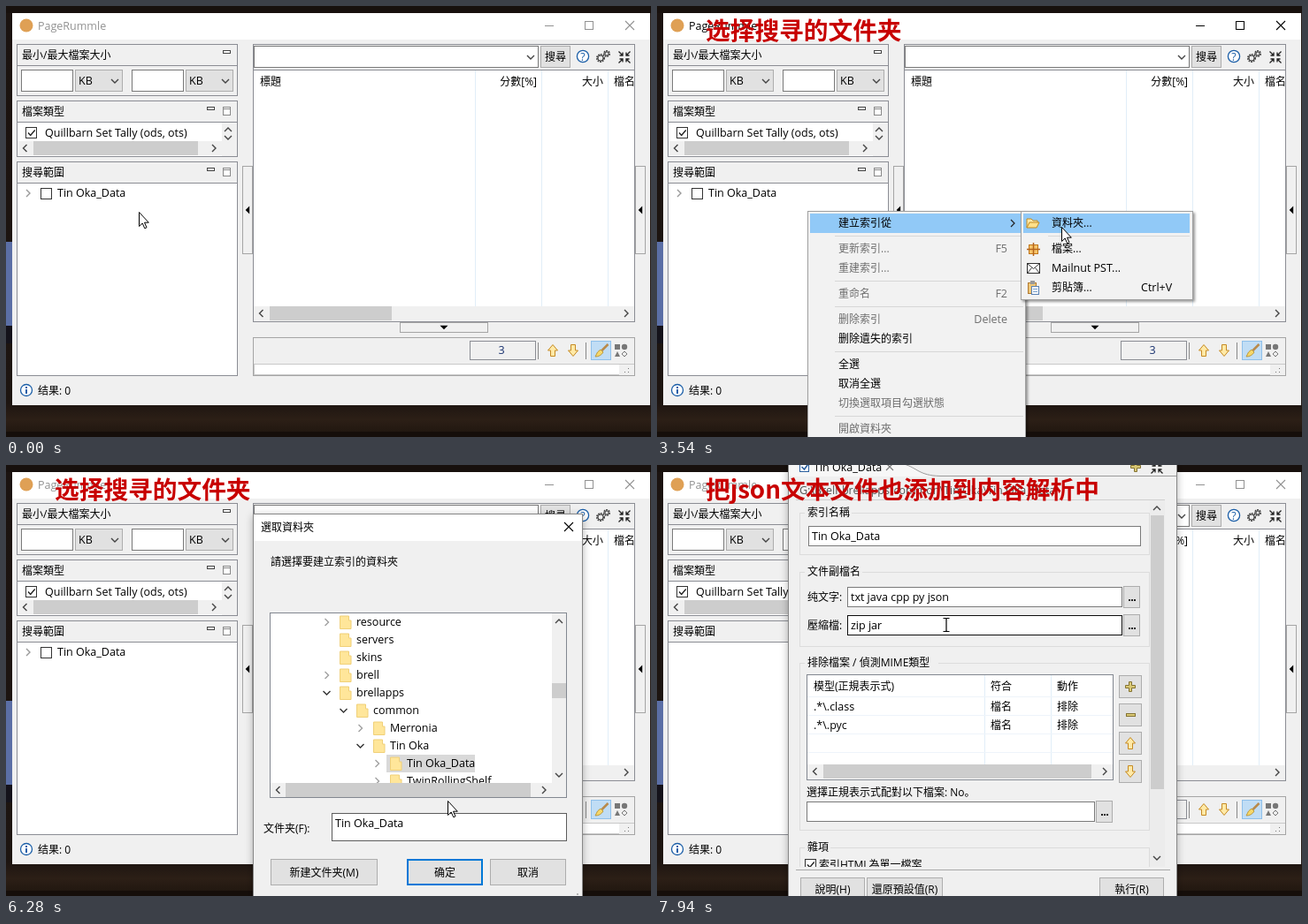
These frames come from a looping animation (729 by 488 pixels, 7990 ms). An HTML page:

```html
<!DOCTYPE html>
<html lang="zh">
<head>
<meta charset="utf-8">
<title>Index setup</title>
<style>
html, body { margin: 0; width: 100%; height: 100%; overflow: hidden; background: #1d1310; }
svg { display: block; }
text { font-family: "Open Sans", "Noto Sans CJK SC", "Noto Sans CJK TC", "Noto Sans CJK", sans-serif; white-space: pre; }
.caption { font-family: "Noto Sans CJK SC", "Noto Sans CJK TC", "Noto Sans CJK", sans-serif; font-weight: 700; font-size: 27.7px; fill: #c80000; }
</style>
</head>
<body>
<svg id="stage" width="729" height="488" viewBox="0 0 729 488"></svg>
<script>
const LOOP = 7990;
const FOLDER = 'Tin Oka_Data';
const FACE = '#f0f0f0', EDGE = '#8b8d94', FIELD = '#7a7a7a', DIM = '#6d6d6d', HOT = '#91c9f7';

// Drawing helpers; boxes are given by their corners.
const box = (x1, y1, x2, y2, fill, stroke, w = 1) => stroke
  ? `<rect x="${x1 + w / 2}" y="${y1 + w / 2}" width="${x2 - x1 - w}" height="${y2 - y1 - w}" fill="${fill}" stroke="${stroke}" stroke-width="${w}"/>`
  : `<rect x="${x1}" y="${y1}" width="${x2 - x1}" height="${y2 - y1}" fill="${fill}"/>`;
const label = (x, y, s, fill = '#000', anchor = 'start', size = /[^\x00-\xff]/.test(s) ? 12 : 12.5) =>
  `<text x="${x}" y="${y}" fill="${fill}" text-anchor="${anchor}" font-size="${size}">${s}</text>`;
const path = (d, stroke = '#000', w = 1, fill = 'none') =>
  `<path d="${d}" stroke="${stroke}" stroke-width="${w}" fill="${fill}"/>`;
const at = (x, y, s, angle = 0) => `<g transform="translate(${x} ${y}) rotate(${angle})">${s}</g>`;
const group = (id, s, extra = '') => `<g id="${id}" ${extra}>${s}</g>`;
const turn = { down: 0, left: 90, up: 180, right: -90 };
const chevron = (x, y, dir, color = '#444', w = 1.4) => at(x, y, path('M-4-2L0 2L4-2', color, w), turn[dir]);
const wedge = (x, y, dir) => at(x, y, path('M-4.5-2.2H4.5L0 2.3Z', 'none', 0, '#000'), turn[dir]);
const cross = (x, y, r = 5, color = '#000') => path(`M${x - r} ${y - r}l${2 * r} ${2 * r}m0 ${-2 * r}l${-2 * r} ${2 * r}`, color, 1.1);
const hline = (x1, x2, y, color = '#d7d7d7') => box(x1, y, x2, y + 1, color);
const vline = (x, y1, y2, color = '#e1eef8') => box(x, y1, x + 1, y2, color);
const field = (x1, y1, x2, y2, s = '', color = FIELD) => box(x1, y1, x2, y2, '#fff', color) + label(x1 + 4, (y1 + y2) / 2 + 4.5, s);
const button = (x1, y1, x2, y2, s = '', stroke = '#adadad', w = 1) =>
  box(x1, y1, x2, y2, '#e1e1e1', stroke, w) + label((x1 + x2) / 2, (y1 + y2) / 2 + 4.5, s, '#000', 'middle');
const check = (x, y, on) => box(x, y, x + 13, y + 13, '#fff', '#333') + (on ? path(`M${x + 3} ${y + 6.5}l2.7 3l5-6`, '#222', 1.4) : '');
const goldArrow = (x, y, dir) => at(x, y, path('M-2.5-6.5H2.5V0H5.5L0 6.5L-5.5 0H-2.5Z', '#c68a22', 1, '#ffe9a6'), turn[dir]);
const hbar = (x1, x2, y, from, to) => box(x1, y, x2, y + 16, FACE) + box(from, y, to, y + 16, '#cdcdcd') +
  chevron(x1 + 8.5, y + 8, 'left') + chevron(x2 - 9, y + 8, 'right');
const collapse = (x, y) => [0, 90, 180, 270].map(a => at(x, y, path('M6.5 6.5L2 2M2 5.5V2H5.5', '#222', 1.3), a)).join('');
const folder = (x, y, tone = '#ffe69a') => path(`M${x} ${y - 7}h10v5h2.5v9.5h-12.5z`, '#f0d078', 1, tone);
const openFolder = (x, y) => path(`M${x - 7} ${y + 5}v-10h5l2 2h5v3`, '#c08a20', 1, '#ffe9a8') +
  path(`M${x - 7} ${y + 5}l3-6h11l-3 6z`, '#c08a20', 1, '#ffe08a');

function panel(y1, split, y2, title, body, zoomable = true) {
  const x = zoomable ? 227 : 245;
  return box(12, y1, 262, y2, body, EDGE) + box(12, y1, 262, split + 1, FACE, EDGE) +
    label(18, y1 + 16.5, title) + box(x, y1 + 7, x + 9, y1 + 11, '#fff', '#444') +
    (zoomable ? box(245, y1 + 7, 254, y1 + 17, '#fff', '#888') + hline(245, 254, y1 + 9, '#888') : '');
}

const combo = x => box(x, 72, x + 54, 97, '#e1e1e1', '#adadad') + label(x + 4, 89, 'KB') + chevron(x + 45, 85, 'down');
const captionButtons = c => hline(609, 619, 22, c) + box(654, 17, 664, 27, 'none', c) + cross(705, 22, 5, c);
const titleBar = c => label(36, 27, 'PageRummle', c) + captionButtons(c);

function desktop() {
  return box(0, 0, 729, 488, 'url(#wood)') + box(0, 0, 729, 8, '#17100d') + box(0, 267, 7, 362, '#5b6fa6') +
    box(0, 362, 7, 382, '#14121a') + box(0, 482, 729, 488, '#150e0a');
}

function mainWindow() {
  const left =
    panel(43, 67, 102, '最小/最大檔案大小', FACE, false) +
    field(17, 72, 76, 97) + combo(78) + field(142, 72, 201, 97) + combo(203) +
    panel(107, 131, 171, '檔案類型', '#fff') + check(22, 137, true) + label(44, 148, 'Quillbarn Set Tally (ods, ots)') +
    box(244, 132, 261, 170, FACE) + chevron(251, 140, 'up') + chevron(251, 149, 'down') + hbar(13, 244, 153, 31, 217) +
    panel(176, 200, 419, '搜尋範圍', '#fff') +
    group('treeRow', chevron(25, 212, 'right', '#999') + check(39, 206) + label(58, 216, FOLDER)) +
    `<circle cx="23" cy="435" r="6.5" fill="#fff" stroke="#1c5fa8" stroke-width="1.3"/>` +
    box(22, 434, 24, 439, '#1c5fa8') + box(22, 431, 24, 433, '#1c5fa8') + label(36, 440, '结果: 0');
  const sashes = box(267, 181, 279, 281, FACE, '#a5a5a5') + wedge(273, 231, 'left') +
    box(711, 181, 723, 281, FACE, '#a5a5a5') + wedge(717, 231, 'left') +
    box(445, 358, 545, 370, FACE, '#a5a5a5') + wedge(495, 364, 'down');
  const gear = (x, y, r) => `<circle cx="${x}" cy="${y}" r="${r}" fill="none" stroke="#444" stroke-width="2" stroke-dasharray="1.7 .9"/><circle cx="${x}" cy="${y}" r="${r - 1}" fill="#eee" stroke="#444"/>`;
  const search = box(279, 43, 711, 358, FACE, EDGE) + field(280, 45, 602, 70) + chevron(593, 58, 'down') +
    button(604, 45, 638, 70, '搜尋') +
    `<circle cx="652" cy="57" r="6.6" fill="#fff" stroke="#1c5fa8" stroke-width="1.3"/>` + label(652, 61.5, '?', '#1c5fa8', 'middle') +
    gear(672, 59, 4) + gear(679, 54, 3) + collapse(699, 58);
  const table = hline(280, 710, 72, EDGE) + box(280, 73, 710, 341, '#fff') +
    [530, 605, 680].map(x => vline(x, 73, 340)).join('') +
    label(287, 90, '標題') + label(600, 90, '分數[%]', '#000', 'end') + label(675, 90, '大小', '#000', 'end') +
    `<g clip-path="url(#tableClip)">${label(687, 90, '檔名')}</g>` + hbar(280, 710, 340, 298, 436);
  const preview = box(279, 375, 711, 419, FACE, '#a5a5a5') + box(280, 405, 710, 418, '#fff', '#c8c8c8') +
    box(693, 406, 710, 418, FACE) + [[703, 410], [699, 414], [703, 414]].map(([x, y]) => box(x, y, x + 1, y + 1, '#777')).join('') +
    box(524, 379, 599, 401, FACE, '#8b8d94') + label(560, 394, '3', '#17306e', 'middle') +
    vline(601, 381, 400, '#888') + goldArrow(618, 390, 'up') + goldArrow(641, 390, 'down') + vline(655, 381, 400, '#888') +
    box(661, 379, 684, 401, '#c0ddf5', '#8fc0ea') +
    path('M680.5 383l-7 7', '#b98a4a', 2.5) + path('M666 397q2-6 6-8l3 3q-3 5-9 5z', '#b08a2a', .8, '#f5d76a') +
    box(688, 383, 694, 389, '#777') + `<circle cx="699" cy="386" r="3.2" fill="#777"/>` +
    path('M688 397l3-6l3 6z', 'none', 0, '#777') + path('M699 391l3 3l-3 3l-3-3z', '#777');
  return box(7, 8, 728, 452, FACE) + box(7, 8, 728, 38, '#fff') +
    `<circle cx="23" cy="22" r="7.5" fill="#dfa055"/>` +
    group('titleOn', titleBar('#000')) + group('titleOff', titleBar('#929292')) + left + search + table + sashes + preview;
}

function contextMenu() {
  const items = [
    [250, '建立索引從'], [279, '更新索引...', 'F5'], [301, '重建索引...', ' '], [330, '重命名', 'F2'],
    [359, '删除索引', 'Delete'], [381, '删除遺失的索引'], [410, '全選'], [432, '取消全選'],
    [454, '切換選取項目勾選狀態', ' '], [483, '開啟資料夾', ' ']];
  return box(170, 232, 417, 500, '#f2f2f2', '#a0a0a0') + box(173, 235, 414, 257, HOT) +
    [260, 311, 340, 391, 464].map(y => hline(201, 414, y)).join('') +
    items.map(([y, s, key]) => label(205, y, s, key ? DIM : '#000') + (key ? label(396, y, key, DIM, 'end') : '')).join('') +
    chevron(402, 246, 'right', '#222', 1.2);
}

const folderItem = () => box(414, 235, 602, 257, HOT) + openFolder(425, 246) + label(446, 250, '資料夾...');

function subMenu() {
  return box(411, 232, 606, 333, '#f2f2f2', '#a0a0a0') + group('subHot', box(414, 235, 602, 257, HOT)) +
    openFolder(425, 246) + label(446, 250, '資料夾...') + hline(442, 602, 260) +
    box(420, 270, 431, 281, '#f7c56a', '#c0741a') + path('M425.5 268v15M418 275.5h15', '#b5641a', 1.5) + label(446, 279, '檔案...') +
    box(418, 291, 433, 303, '#fff', '#333') + path('M418.5 291.5l7 6l7-6M418.5 302.5l5-6M432.5 302.5l-5-6', '#333') + label(446, 301, 'Mailnut PST...') +
    box(419, 313, 429, 326, '#f0c878', '#b07a30') + box(422, 311, 427, 315, '#999') + box(423, 317, 432, 327, '#fff', '#5a82b4') +
    hline(425, 430, 320, '#7aa0cc') + hline(425, 430, 323, '#7aa0cc') + label(446, 323, '剪貼簿...') + label(547, 323, 'Ctrl+V');
}

// Tree entries: depth, name, marker (+ closed, - open).
const tree = [
  [0, 'Stuff', '+'], [0, 'msdownld.tmp', ''], [0, 'Vornel', '+'], [0, 'Brell', '-'],
  [1, 'appcache', '+'], [1, 'bin', '+'], [1, 'clientui', '+'], [1, 'config', ''], [1, 'controller_base', '+'],
  [1, 'depotcache', ''], [1, 'dumps', ''], [1, 'friends', '+'], [1, 'graphics', ''], [1, 'logs', ''], [1, 'music', '+'],
  [1, 'package', '+'], [1, 'public', ''], [1, 'remoteui', '+'], [1, 'resource', '+'], [1, 'servers', ''], [1, 'skins', ''],
  [1, 'brell', '+'], [1, 'brellapps', '-'], [2, 'common', '-'], [3, 'Merronia', '+'], [3, 'Tin Oka', '-'],
  [4, FOLDER, '+'], [4, 'TwinRollingShelf', '+']];

function treeRows() {
  return tree.map(([depth, name, mark], i) => {
    const x = 343 + depth * 19, y = 178 + i * 20;
    return (name === FOLDER ? box(x + 11, y - 10, x + 111, y + 10, '#d9d9d9') : '') +
      (mark ? chevron(x + .5, y, mark === '+' ? 'right' : 'down', mark === '+' ? '#a0a0a0' : '#333') : '') +
      folder(x + 15.5, y, i === 1 ? '#fff3cc' : undefined) + label(x + 34, y + 4, name);
  }).join('');
}

function folderDialog() {
  return box(279, 55, 652, 500, FACE, '#888') + box(280, 56, 651, 86, '#fff') + label(288, 75, '選取資料夾') + cross(636, 70) +
    label(299, 114, '請選擇要建立索引的資料夾') + box(298, 167, 634, 377, '#fff', '#828790') +
    `<g clip-path="url(#treeClip)">${group('rows', treeRows())}</g>` +
    box(617, 168, 633, 360, FACE) + chevron(625, 177, 'up') + chevron(625, 351, 'down') + group('thumb', box(617, 216, 633, 233, '#cdcdcd')) +
    hbar(299, 617, 360, 316, 593) + box(617, 360, 633, 376, FACE) +
    label(291, 416, '文件夹(F):') + box(368, 394, 634, 426, '#fff', '#5c5c5c') + label(372, 410, FOLDER) +
    button(299, 446, 420, 476, '新建文件夹(M)') + button(453, 446, 539, 476, '确定', '#0078d7', 2) + button(547, 446, 633, 476, '取消') +
    box(645, 485, 647, 487, '#b5b5b5');
}

function indexDialog() {
  const frame = (y1, y2, s, w) => box(161, y1, 557, y2, 'none', '#dcdcdc') + box(167, y1 - 2, 172 + w, y1 + 3, FACE) + label(170, y1 + 4, s);
  const plus = (x, y) => path(`M${x - 1.5} ${y - 5.5}h3v4h4v3h-4v4h-3v-4h-4v-3h4z`, '#847332', 1, '#d9c874');
  const more = (x, y) => button(x, y, x + 19, y + 25) + [6, 9, 12].map(d => box(x + d, y + 15, x + d + 2, y + 17, '#222')).join('');
  return box(148, -5, 588, 500, FACE, '#888') +
    path('M149 -1V13H587V12.5H320C294 12 294 3 279-1', 'none', 0, '#f7f7f7') +
    path('M587 12.5H320C296 12 294 3 279-1', '#9a9a9a') +
    box(161, -3, 172, 8, '#fff', '#2c5f9e') + path('M163.5 2l3 3l5-7', '#2c5f9e', 1.6) +
    label(177, 7, FOLDER) + cross(263, 2, 4, '#777') + plus(541, 2) + collapse(565, 3) +
    label(161, 33, 'G:\\Brell\\brellapps\\common\\Tin Oka\\' + FOLDER, '#555') + hline(157, 574, 39, '#cfcfcf') +
    `<g clip-path="url(#formClip)">` +
    frame(54, 102, '索引名稱', 48) + field(171, 69, 547, 92, FOLDER) +
    frame(121, 206, '文件副檔名', 60) + label(170, 154, '纯文字:') + field(215, 138, 526, 161, 'txt java cpp py json') + more(527, 137) +
    label(170, 186, '壓縮檔:') + field(215, 170, 526, 193, 'zip jar', '#111') + more(527, 169) +
    frame(224, 414, '排除檔案 / 偵測MIME類型', 146) + box(169, 237, 516, 357, '#fff', '#828790') +
    [370, 445].map(x => vline(x, 238, 339)).join('') + [262, 283, 304, 325].map(y => hline(170, 515, y, '#eef4fa')).join('') +
    [[255, '模型(正規表示式)', '符合', '動作'], [278, '.*\\.class', '檔名', '排除'], [299, '.*\\.pyc', '檔名', '排除']]
      .map(([y, ...cells]) => cells.map((s, i) => label([177, 377, 452][i], y, s)).join('')).join('') +
    hbar(170, 515, 339, 188, 491) +
    [238, 270, 302, 334].map(y => button(522, y, 548, y + 26)).join('') + plus(535, 251) +
    box(530, 281, 541, 285, '#d9c874', '#847332') + goldArrow(535, 315, 'up') + goldArrow(535, 347, 'down') +
    label(169, 375, '選擇正規表示式配對以下檔案: No。') + field(169, 381, 495, 404) + more(496, 380) +
    frame(433, 500, '雜項', 24) + check(167, 446, true) + label(183, 457, '索引HTML為單一檔案') + '</g>' +
    box(557, 40, 574, 455, '#ececec') + box(558, 57, 573, 367, '#cdcdcd') + chevron(565, 49, 'up') + chevron(565, 445, 'down') +
    hline(157, 580, 458, '#a9a9a9') + button(162, 467, 235, 493, '說明(H)') + button(237, 467, 323, 493, '還原預設值(R)') + button(500, 467, 573, 493, '執行(R)');
}

const pointers =
  group('arrow', path('M.5.5V16.5L4.2 13L6.8 18.8L9 17.8L6.5 12.2H11.3Z', '#000', 1, '#fff')) +
  group('beam', path('M-3.5-7.5H-1Q0-7.5 0-6.5Q0-7.5 1-7.5H3.5M0-7V7M-3.5 7.5H-1Q0 7.5 0 6.5Q0 7.5 1 7.5H3.5', '#000', 1.2)) +
  group('busy', '<circle r="7.8" fill="#fff" stroke="#2196ec" stroke-width="4.5"/>' +
    group('busyArc', '<path d="M0-7.8A7.8 7.8 0 0 1 7.8 0" fill="none" stroke="#6cc0fa" stroke-width="4.5"/>'));

const clip = (id, x1, y1, x2, y2) => `<clipPath id="${id}">${box(x1, y1, x2, y2, '#000')}</clipPath>`;
const shadow = (id, offset, blur, opacity) => `<filter id="${id}" x="-8%" y="-8%" width="116%" height="116%">` +
  `<feDropShadow dx="${offset}" dy="2" stdDeviation="${blur}" flood-opacity="${opacity}"/></filter>`;
const MENU_SHADE = 'filter="url(#menuShade)"', DIALOG_SHADE = 'filter="url(#dialogShade)"';
document.getElementById('stage').innerHTML = `<defs>
  <linearGradient id="wood" x2="0" y2="1"><stop stop-color="#1b1310"/><stop offset=".92" stop-color="#1d1511"/><stop offset=".96" stop-color="#2c1f16"/><stop offset="1" stop-color="#1d140e"/></linearGradient>
  ${shadow('menuShade', 2, 1.5, .4)}${shadow('dialogShade', 0, 4, .3)}
  ${clip('tableClip', 280, 73, 710, 340)}${clip('treeClip', 299, 168, 617, 360)}${clip('formClip', 150, 40, 557, 455)}</defs>` +
  desktop() + mainWindow() +
  group('menu', contextMenu(), MENU_SHADE) + group('submenu', subMenu(), MENU_SHADE) +
  group('fading', folderItem()) +
  group('picker', folderDialog(), DIALOG_SHADE) + group('indexer', indexDialog(), DIALOG_SHADE) +
  group('caption1', '<text class="caption" x="55" y="38">选择搜寻的文件夹</text>') +
  group('caption2', '<text class="caption" x="55" y="38">把json文本文件也添加到内容解析中</text>') +
  group('pointer', pointers);

const el = id => document.getElementById(id);
const CLICK = 4450, PICK = 4850, OK = 7150, INDEX = 7200, CAPTION = 7550;
const spans = {
  titleOn: [[400, PICK], [OK, INDEX]], titleOff: [[0, 400], [PICK, OK], [INDEX, LOOP]],
  treeRow: [[0, INDEX]], menu: [[400, CLICK]], submenu: [[1300, CLICK]], subHot: [[1950, CLICK]],
  fading: [[CLICK, 4810]], picker: [[PICK, OK]], indexer: [[INDEX, LOOP]],
  caption1: [[100, CAPTION]], caption2: [[CAPTION, LOOP]],
  arrow: [[0, CLICK], [PICK, 7780]], busy: [[CLICK, PICK]], beam: [[7780, LOOP]]
};
const route = [
  [0, 150, 233], [100, 150, 233], [330, 170, 232], [480, 170, 232], [850, 250, 245], [1650, 250, 245],
  [2000, 415, 248], [2300, 457, 250], [4900, 457, 250], [5300, 485, 287], [5900, 485, 287],
  [6600, 510, 452], [7180, 510, 452], [7800, 327, 181], [LOOP, 327, 181]];

function position(t) {
  const i = Math.max(1, route.findIndex(p => p[0] > t));
  const [t0, x0, y0] = route[i - 1], [t1, x1, y1] = route[i];
  const u = (t - t0) / (t1 - t0), k = u * u * (3 - 2 * u);
  return [Math.round(x0 + (x1 - x0) * k), Math.round(y0 + (y1 - y0) * k)];
}

function render(t) {
  for (const id in spans) el(id).style.display = spans[id].some(([a, b]) => t >= a && t < b) ? '' : 'none';
  el('fading').style.opacity = Math.max(0, Math.min(1, 1 - (t - CLICK) / 360));
  const scroll = Math.round(18 * Math.max(0, Math.min(1, (t - 5420) / 350)));
  el('rows').setAttribute('transform', `translate(0 ${-20 * scroll})`);
  el('thumb').setAttribute('transform', `translate(0 ${scroll * 31 / 18})`);
  el('pointer').setAttribute('transform', `translate(${position(t)})`);
  el('busyArc').setAttribute('transform', `rotate(${t * .36})`);
}

function tick() {
  render(performance.now() % LOOP);
  requestAnimationFrame(tick);
}
tick();
</script>
</body>
</html>
```
